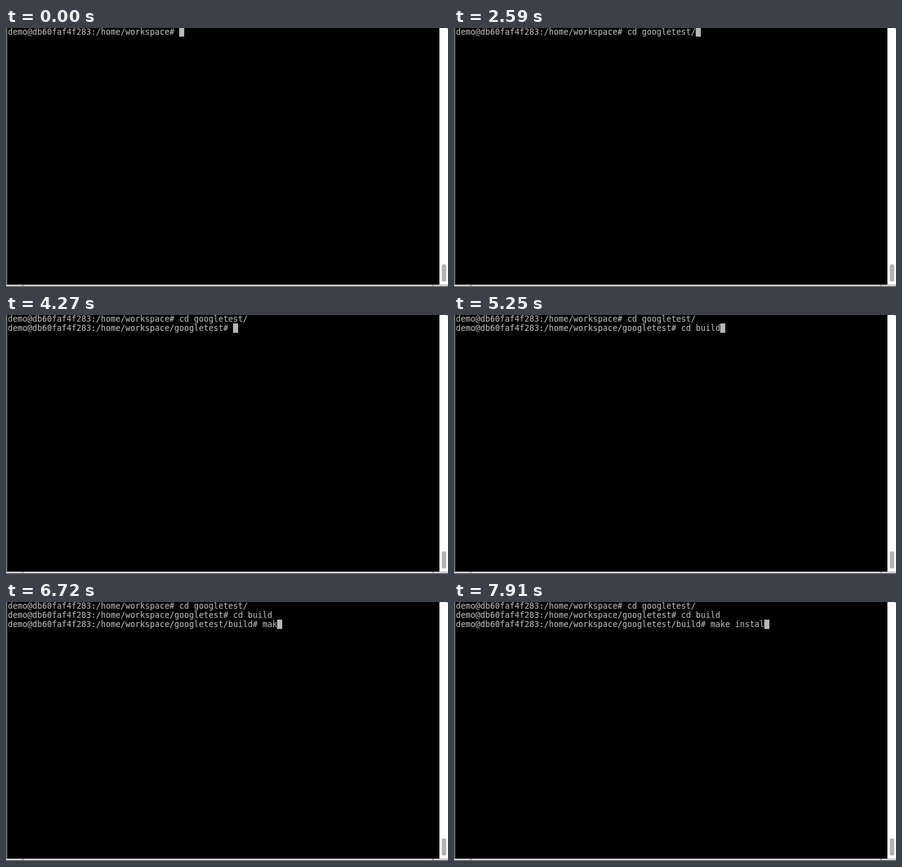
These frames come from a looping animation (722x424 px, 8000 ms). An HTML page:

```html
<!DOCTYPE html>
<html lang="en">
<head>
<meta charset="utf-8">
<title>Terminal</title>
<style>
html, body { margin: 0; width: 100%; height: 100%; overflow: hidden; background: #000; }
#stage { position: relative; width: 722px; height: 424px; overflow: hidden; background: #000; }
#stage div { position: absolute; }
#screen {
  left: 3px; top: -1px; margin: 0; position: absolute;
  font: 13.29px/15px "DejaVu Sans Mono", monospace;
  letter-spacing: calc(8px - 1ch);
  color: #b2b2b2; white-space: pre;
  text-shadow: 0 0 1px #b2b2b260;
}
#cursor { width: 8px; height: 15px; background: #b8b8b8; box-shadow: 0 0 1px #b8b8b8; }
#left { left: 0; top: 0; width: 2px; height: 420px; background: linear-gradient(90deg, #555 50%, #8c8c8c 50%); }
#bar { left: 708px; top: 0; width: 14px; height: 420px; background: #fff; }
#thumb { left: 4px; top: 387px; width: 7px; height: 28px; border-radius: 3.5px; background: #b4b4b4; box-shadow: 0 0 1px #b4b4b4; }
#corner { left: 721px; top: 0; width: 1px; height: 1px; background: #222; }
#bottom { left: 0; top: 420px; width: 722px; height: 4px; background: linear-gradient(#b0b0b0 25%, #f0f0f0 25% 50%, #9a9a9a 50% 75%, #606060 75%); }
.tick { top: 420px; width: 1px; height: 3px; background: #555; }
</style>
</head>
<body>
<div id="stage">
  <pre id="screen"></pre>
  <div id="cursor"></div>
  <div id="left"></div>
  <div id="bar"><div id="thumb"></div></div>
  <div id="corner"></div>
  <div id="bottom"></div>
  <div class="tick" style="left:27px"></div>
  <div class="tick" style="left:697px"></div>
</div>
<script>
const LOOP = 8000;
const prompt = dir => `demo@db60faf4f283:/home/workspace${dir}# `;

// Each line: when its prompt appears, and [time, typed text so far] steps.
const lines = [
  { at: 0, prompt: prompt(""), keys: [
    [910, "c"], [1120, "cd"], [1330, "cd "], [1820, "cd g"], [1960, "cd go"],
    [2100, "cd goo"], [2590, "cd googletest/"]] },
  { at: 3010, prompt: prompt("/googletest"), keys: type("cd build", 4340, 130) },
  { at: 5390, prompt: prompt("/googletest/build"), keys: [
    ...type("make", 6510, 100), ...type(" ins", 7000, 140, "make"),
    ...type("tal", 7630, 140, "make ins")] }
];
const cursorOff = [[140, 700], [3710, 4270], [5950, 6510]];

function type(text, start, gap, before = "") {
  return [...text].map((_, i) => [start + i * gap, before + text.slice(0, i + 1)]);
}

const screen = document.getElementById("screen");
const cursor = document.getElementById("cursor");

function draw(now) {
  const t = now % LOOP;
  const rows = lines.filter(line => t >= line.at).map(line => {
    const typed = line.keys.filter(([time]) => t >= time).pop();
    return line.prompt + (typed ? typed[1] : "");
  });
  const text = rows.join("\n");
  if (screen.textContent !== text) screen.textContent = text;
  cursor.style.left = 3 + rows.at(-1).length * 8 + "px";
  cursor.style.top = rows.length * 15 - 16 + "px";
  cursor.hidden = cursorOff.some(([from, to]) => t >= from && t < to);
}

const start = performance.now();
function frame() {
  draw(performance.now() - start);
  requestAnimationFrame(frame);
}
frame();
</script>
</body>
</html>
```
